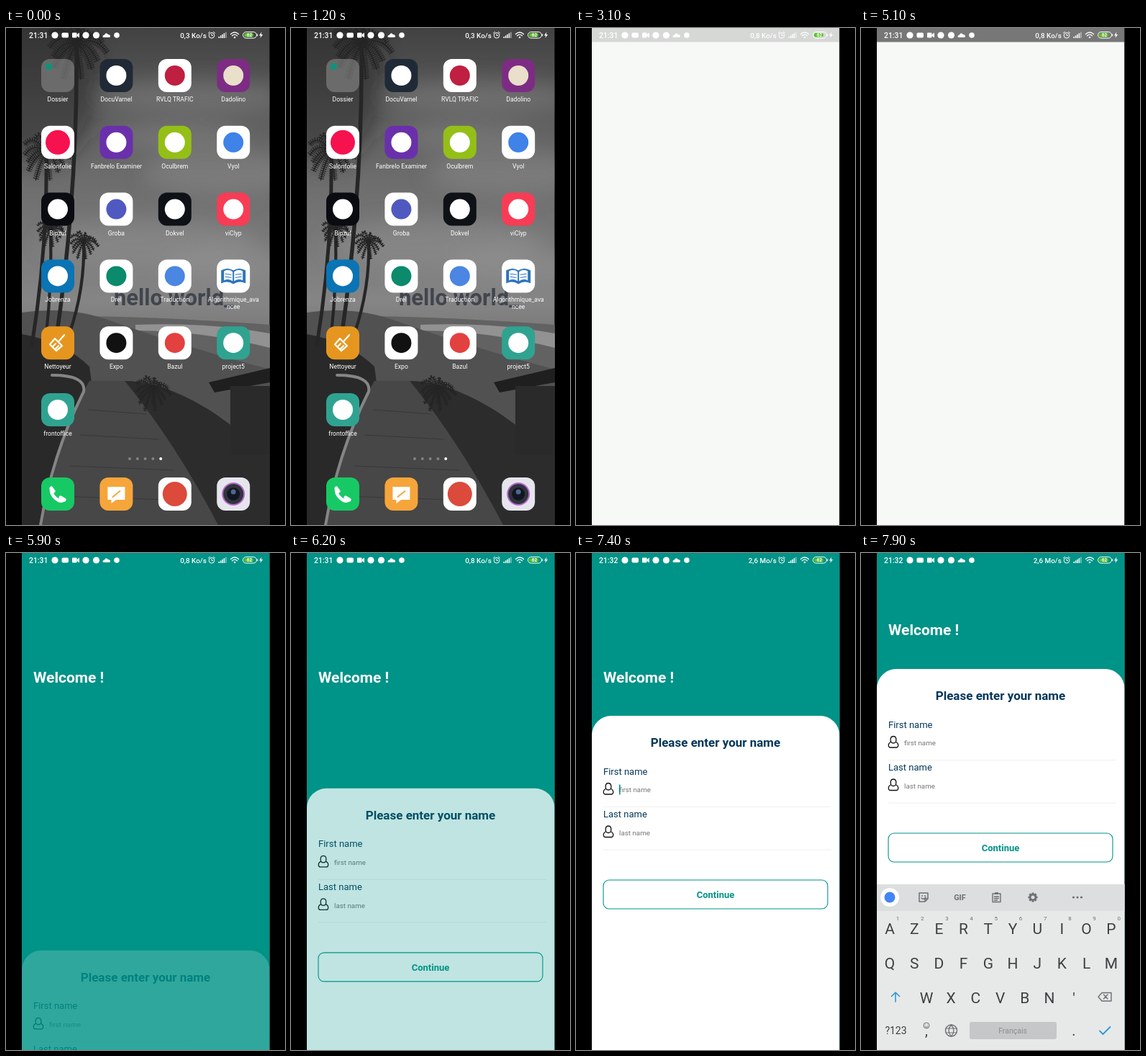
Recreate the animation shown at these times as an HTML page. Size 388 px wide and 690 px high, loop 8000 ms.

```html
<!DOCTYPE html>
<html lang="fr">
<head>
<meta charset="utf-8">
<style>
html, body { margin: 0; width: 100%; height: 100%; overflow: hidden; background: #000; }
svg { display: block; width: 388px; height: 690px; font-family: Roboto, "Open Sans", sans-serif; }
.mid { text-anchor: middle; }
.bold { font-weight: 700; }
.line { fill: none; stroke-linecap: round; stroke-linejoin: round; }
</style>
</head>
<body>
<svg id="stage" viewBox="0 0 388 690"></svg>
<script>
const LOOP = 8000, STEP = 100;
const PHONE = { x: 22, w: 344.5, h: 690, cx: 194, cy: 345 };
const TEAL = '#009387', NAVY = '#05375a';

const rect = (x, y, w, h, fill, r = 0, more = '') =>
  `<rect x="${x}" y="${y}" width="${w}" height="${h}" rx="${r}" fill="${fill}" ${more}/>`;
const circle = (x, y, r, fill, more = '') =>
  `<circle cx="${x}" cy="${y}" r="${r}" fill="${fill}" ${more}/>`;
const fill = (d, color, more = '') => `<path d="${d}" fill="${color}" ${more}/>`;
const line = (d, color, width = 1, more = '') =>
  `<path class="line" d="${d}" stroke="${color}" stroke-width="${width}" ${more}/>`;
const text = (s, x, y, size, color, cls = '', more = '') =>
  `<text x="${x}" y="${y}" font-size="${size}" fill="${color}" class="${cls}" ${more}>${s}</text>`;
const group = (id, body, more = '') => `<g id="${id}" ${more}>${body}</g>`;
const at = (x, y, body) => `<g transform="translate(${x} ${y})">${body}</g>`;

// ---- wallpaper ----
function palm(x, y, r, footX, footY) {
  let out = line(`M${x} ${y}Q${x + 2} ${(y + footY) / 2} ${footX} ${footY}`, '#262626', 3 + r / 20);
  for (let i = 0; i < 13; i++) {
    const a = i / 13 * Math.PI * 2, len = r * (0.85 + 0.2 * Math.sin(i * 5));
    const dx = Math.cos(a) * len, dy = Math.sin(a) * len * 0.75;
    const d = `M${x} ${y}Q${x + dx * 0.6} ${y + dy * 0.8 - r * 0.25} ${x + dx} ${y + dy + r * 0.25}`;
    out += line(d, '#222', 1.5);
    out += `<path d="${d}" fill="none" stroke="#262626" stroke-width="${r / 5}" stroke-dasharray="1.3 1.5"/>`;
  }
  return out;
}

function wallpaper() {
  const clouds = [[260, 95, 130, 24], [300, 200, 110, 30], [200, 300, 150, 34], [240, 150, 90, 16], [310, 330, 90, 25]];
  return rect(22, 0, 345, 690, 'url(#sky)')
    + `<g filter="url(#soft)">${clouds.map(([x, y, rx, ry]) =>
      `<ellipse cx="${x}" cy="${y}" rx="${rx}" ry="${ry}" fill="#a0a0a0" opacity=".3"/>`).join('')}
      <ellipse cx="50" cy="70" rx="80" ry="120" fill="#222" opacity=".45"/></g>`
    + fill('M22 402Q150 396 367 412V480H22Z', '#626262')
    + fill('M180 412Q280 408 367 424V444Q270 420 180 420Z', '#929292')
    + fill('M22 395Q90 385 150 408Q240 440 367 474V690H22Z', '#515151')
    + fill('M22 425Q80 435 116 470L120 500Q80 540 48 690H22Z', '#292929')
    + fill('M116 490H165Q235 570 300 690H50Q70 570 116 490Z', '#474747')
    + line('M64 482Q112 482 108 505Q65 590 48 690', '#858585', 4)
    + fill('M165 490Q220 490 290 535L367 590V690H295Q235 575 165 490Z', '#2c2c2c')
    + [530, 565, 608, 650].map(y => line(`M${125 - (y - 500) / 3} ${y}L${195 + (y - 530) / 2} ${y + 6}`, '#383838', 1)).join('')
    + palm(204, 502, 30, 204, 520)
    + fill('M282 492L367 472V492L290 506Z', '#1f1f1f')
    + rect(312, 497, 55, 96, '#2a2a2a')
    + palm(62, 280, 24, 56, 425) + palm(108, 297, 24, 88, 425)
    + palm(56, 172, 40, 36, 440) + palm(98, 22, 50, 70, 430)
    + text('hello world_', 150, 385, 31, '#41454d', 'bold');
}

// ---- launcher ----
const APPS = [
  ['Dossier', '#8a8a8a99'], ['DocuVarnel', '#202a36', '#fff'], ['RVLQ TRAFIC', '#fff', '#bf1f40'], ['Dadolino', '#7d2c83', '#eadfca'],
  ['Salonfolie', '#fff', '#f5124f'], ['Fanbrelo Examiner', '#6a30ac', '#fff'], ['Oculbrem', '#94bf17', '#fff'], ['Vyol', '#fff', '#3f82e8'],
  ['Bipzul', '#0b0b12', '#fff'], ['Groba', '#fff', '#5059c0'], ['Dokvel', '#0e1217', '#fff'], ['viClyp', '#f83c56', '#fff'],
  ['Jobrenza', '#0a74b4', '#fff'], ['Drel', '#fff', '#0b8a6c'], ['Traduction', '#fff', '#4a86e2'], ['Algorithmique_ava', '#fff'],
  ['Nettoyeur', '#e6961f'], ['Expo', '#fff', '#111'], ['Bazul', '#fff', '#e34040'], ['project5', '#2fa390', '#fff'],
  ['frontoffice', '#2fa390', '#fff']
];
const tile = color => rect(-23, -23, 46, 46, color, 12);
const EXTRAS = {
  0: rect(-17, -17, 9, 9, '#158f7a', 2),
  15: fill('M-17 -8Q-8 -13 0 -8Q8 -13 17 -8V10Q8 6 0 11Q-8 6 -17 10Z', '#2b75bd')
    + fill('M-13 -7Q-6 -10 -1 -6V7Q-7 3 -13 6ZM13 -7Q6 -10 1 -6V7Q7 3 13 6Z', '#fff')
    + line('M-11 -3L-3 -2M-11 1L-3 2M11 -3L3 -2M11 1L3 2', '#2b75bd'),
  16: line('M9 -11L2 -3M-4 -6L6 4L-2 11L-11 2ZM-7 5L-3 1M-3 8L1 4', '#fff', 2.2)
};
const appIcon = ([label, color, mark], i) => at(72 + i % 4 * 81.4, 66 + Math.floor(i / 4) * 92.8,
  tile(color) + (mark ? circle(0, 0, i === 4 ? 17 : 14, mark) : '') + (EXTRAS[i] || '')
  + text(label, 0, 36, 8.6, '#fff', 'mid')
  + (i === 15 ? text('ncee', 0, 46, 8.6, '#fff', 'mid') : ''));

function launcher() {
  const dots = [0, 1, 2, 3, 4].map(i => circle(172 + i * 10.8, 598, 2, i === 4 ? '#fff' : '#aaa9')).join('');
  const dock = [
    tile('#17c964') + line('M-9 -8Q-10 0 -3 6Q4 12 9 8', '#fff', 4.5) + line('M-9 -8L-6 -4M9 8L4 5', '#fff', 5),
    tile('#f6a53a') + fill('M-12 -10H12V8H0L-7 13V8H-12Z', '#fff') + line('M-5 4L5 -4', '#f6a53a', 2),
    tile('#fff') + circle(0, 0, 17, '#db4a3b'),
    tile('#e6e5ed') + circle(0, 0, 15, '#32343f', 'stroke="#b56acb" stroke-width="2"')
      + circle(0, 0, 9, '#111722') + circle(0, -3, 3.5, '#53658e')
  ];
  return APPS.map(appIcon).join('') + dots + dock.map((d, i) => at(72 + i * 81.4, 647, d)).join('');
}

// ---- status bar ----
function statusBar() {
  const w = '#fff';
  const bars = [0, 1, 2, 3, 4].map(i => rect(295.5 + i * 2.4, 12 - i * 1.6, 1.5, 2 + i * 1.6, w, 0, i > 3 ? 'opacity=".5"' : '')).join('');
  return text('21:31', 32, 13.8, 10.4, w, '', 'id="clock" font-weight="500"')
    + circle(68, 10, 4.6, w) + rect(77.5, 6.5, 9.5, 7, w, 2)
    + rect(92, 6.5, 6.5, 7, w, 1) + fill('M98.5 9L102 6.5V13.5L98.5 11Z', w)
    + circle(111, 10, 4.6, w) + circle(125.5, 10, 4.6, w)
    + fill('M136 13Q134.5 13 134.5 11.5Q135 9.5 137 9.5Q139 5.5 142 9Q145 9 145 11.5Q145 13 143 13Z', w)
    + circle(154, 10, 3.8, w)
    + text('', 278.8, 13.6, 9.9, w, '', 'id="speed" text-anchor="end" font-weight="500"')
    + circle(286, 10.3, 3.8, 'none', `stroke="${w}"`) + line('M286 8.5V10.5H287.5M281.5 7L283.5 5.3M290.5 7L288.5 5.3', w)
    + bars
    + line('M312.5 8.5Q318 3.5 323.5 8.5M314.5 10.8Q318 7.5 321.5 10.8', w, 1.3) + circle(318, 13, 1.3, w)
    + rect(329.5, 5.5, 19, 8.6, 'none', 4.3, `stroke="${w}"`) + rect(331, 7, 13, 5.6, '#59c323', 2.8)
    + text('62', 338.6, 12.3, 6.5, w, 'mid bold') + rect(349.2, 8.3, 1, 3, w)
    + fill('M355.5 5.5L352 10.5H354.3L353.5 14L357.2 9H354.9Z', w);
}

// ---- form ----
const person = y => at(45, y, line('M-3.5 -1Q-5 -8.5 0 -8.5Q5 -8.5 3.5 -1Q2.5 1 0 1Q-2.5 1 -3.5 -1ZM-3.8 -.5Q-7 1 -6.7 4.5Q-6.5 7 -4 7H4Q6.5 7 6.7 4.5Q7 1 3.8 -.5', '#111', 1.3));
const field = (label, hint, y) => text(label, 38, y + 81.5, 13, NAVY) + person(y + 102)
  + text(hint, 60, y + 106.3, 9.8, '#747474') + rect(38, y + 126, 317, 1, '#f0f0f0');

function sheet() {
  return rect(22, 0, 344.5, 700, '#fff', 27)
    + text('Please enter your name', 194, 43, 17, NAVY, 'mid bold')
    + field('First name', 'first name', 0) + field('Last name', 'last name', 59.5)
    + rect(38, 228, 312, 40, '#fff', 8, `stroke="${TEAL}" stroke-width="1.1"`)
    + text('Continue', 194, 253, 13, TEAL, 'mid bold')
    + rect(60, 95.5, 1.6, 14, TEAL, 0, 'id="cursor"');
}

// ---- keyboard ----
function keyboard() {
  const ink = '#3d4042', dim = '#6d7173', blue = '#2f97d8';
  const row = (keys, x, y) => [...keys].map((k, i) => text(k, x + i * 34.2, y, 21, ink, 'mid')).join('');
  const digits = [...'1234567890'].map((n, i) => text(n, 51 + i * 34.2, 510, 8, dim, 'mid')).join('');
  const teeth = [0, 1, 2, 3, 4, 5, 6, 7].map(i => `<path d="M0 -6.5V-4" stroke="${dim}" stroke-width="3" transform="rotate(${i * 45})"/>`).join('');
  return rect(22, 460, 345, 240, '#e7e9e9') + rect(22, 460, 345, 37, '#dcdedf')
    + circle(40, 478, 13, '#fff') + circle(40, 478, 7.5, '#4285f4')
    + at(87, 478, line('M-6 -6H6V2L2 6H-6ZM6 2H2V6M-3 1Q0 4 3 0', dim, 1.5) + circle(-2, -2, 1, dim) + circle(2, -2, 1, dim))
    + text('GIF', 137.5, 482, 11, dim, 'mid bold')
    + at(188.5, 478, line('M-5.5 -5H5.5V6.5H-5.5ZM-3 -1H3M-3 1.5H3M-3 4H1', dim, 1.4) + rect(-2.5, -7, 5, 3, dim, 1))
    + at(239, 478, teeth + circle(0, 0, 3.8, 'none', `stroke="${dim}" stroke-width="2.6"`))
    + [295.5, 301, 306.5].map(x => circle(x, 478, 1.6, dim)).join('')
    + digits + row('AZERTYUIOP', 40, 529) + row('QSDFGHJKLM', 40, 577) + row("WXCVBN'", 91, 624.5)
    + line('M48 623V610M42.5 615.5L48 610L53.5 615.5', blue, 1.6)
    + line('M335 610.5H348V622H335L330 616.2ZM337.5 613L343 619M343 613L337.5 619', dim, 1.4)
    + text('?123', 48.5, 668, 14, ink, 'mid') + text(',', 91, 670, 20, ink, 'mid')
    + circle(91, 656, 4, 'none', `stroke="${dim}"`) + line('M89 657.5Q91 659.5 93 657.5M89.5 655H89.6M92.5 655H92.6', dim)
    + at(125.5, 663, circle(0, 0, 8, 'none', `stroke="${dim}" stroke-width="1.4"`)
      + line('M0 -8Q-7 0 0 8Q7 0 0 -8M-7.5 -3H7.5M-7.5 3H7.5', dim, 1.2))
    + rect(151, 651, 121, 24, '#c5c7c8', 3) + text('Français', 211, 667, 10.5, '#8b8e90', 'mid')
    + text('.', 296, 670, 20, ink, 'mid') + line('M332 663.5L336.5 668L346.5 658', blue, 1.8);
}

const stage = document.getElementById('stage');
stage.innerHTML = `<defs>
  <linearGradient id="sky" x2="0" y2="1">
    <stop offset="0" stop-color="#424242"/><stop offset=".2" stop-color="#626262"/>
    <stop offset=".55" stop-color="#858585"/><stop offset="1" stop-color="#333"/>
  </linearGradient>
  <filter id="soft" x="-50%" y="-50%" width="200%" height="200%"><feGaussianBlur stdDeviation="14"/></filter>
  <clipPath id="screen">${rect(PHONE.x, 0, PHONE.w, PHONE.h, '#000')}</clipPath>
</defs>` + rect(0, 0, 388, 690, '#000')
  + `<g clip-path="url(#screen)">`
  + group('home', wallpaper() + group('icons', launcher()))
  + rect(0, 0, 0, 0, '#f7f9f7', 0, 'id="splash"')
  + rect(22, 0, 345, 19.5, '#000', 0, 'id="shade"')
  + group('app', rect(22, 0, 345, 690, TEAL)
    + text('Welcome !', 38, 180, 21, '#fff', 'bold', 'id="welcome"')
    + group('sheet', sheet()))
  + group('keyboard', keyboard()) + statusBar() + '</g>';

const el = Object.fromEntries([...stage.querySelectorAll('[id]')].map(n => [n.id, n]));
const set = (node, attrs) => Object.entries(attrs).forEach(([k, v]) => node.setAttribute(k, v));
const show = (node, on) => set(node, { display: on ? 'inline' : 'none' });
const ramp = (t, from, to) => Math.min(1, Math.max(0, (t - from) / (to - from)));
const smooth = p => p * p * (3 - 2 * p);
const mix = (a, b, p) => a + (b - a) * p;

// cubic-bezier(.25, .1, .25, 1)
function ease(p) {
  const bez = (a, b, s) => 3 * a * s * (1 - s) ** 2 + 3 * b * s * s * (1 - s) + s ** 3;
  let lo = 0, hi = 1;
  for (let i = 0; i < 20; i++) {
    const s = (lo + hi) / 2;
    if (bez(0.25, 0.25, s) < p) lo = s; else hi = s;
  }
  return bez(0.1, 1, lo);
}

function render(t) {
  const open = smooth(ramp(t, 1650, 2100));
  const shrink = 1 - 0.141 * open;
  set(el.icons, { transform: `translate(${PHONE.cx} ${PHONE.cy}) scale(${shrink}) translate(${-PHONE.cx} ${-PHONE.cy})` });
  show(el.home, open < 1);
  const w = mix(46, PHONE.w, open), h = mix(46, PHONE.h, open);
  set(el.splash, { x: mix(72, PHONE.cx + 0.25, open) - w / 2, y: mix(530, PHONE.cy, open) - h / 2, width: w, height: h });
  show(el.splash, open > 0);
  set(el.shade, { opacity: 0.52 * ramp(t, 3030, 3300) });

  const inApp = t >= 5800, typing = t >= 7600;
  show(el.app, inApp);
  const rise = ease(ramp(t, 5750, 6750));
  set(el.sheet, { transform: `translate(0 ${(typing ? 161 : 226) + 400 * (1 - rise)})`, opacity: rise });
  set(el.welcome, { y: typing ? 114 : 180 });
  set(el.cursor, { opacity: t >= 7200 && t < 7800 ? 1 : 0 });
  show(el.keyboard, typing);
  set(el.keyboard, { transform: `translate(0 ${230 * (1 - ramp(t, 7550, 7850)) ** 2})` });

  el.clock.textContent = t < 6900 ? '21:31' : '21:32';
  el.speed.textContent = t < 2100 ? '0,3 Ko/s' : t < 6900 ? '0,8 Ko/s' : '2,6 Mo/s';
}

const start = performance.now();
function tick() {
  const t = (performance.now() - start) % LOOP;
  render(Math.floor(t / STEP) * STEP);
  requestAnimationFrame(tick);
}
tick();
</script>
</body>
</html>
```
